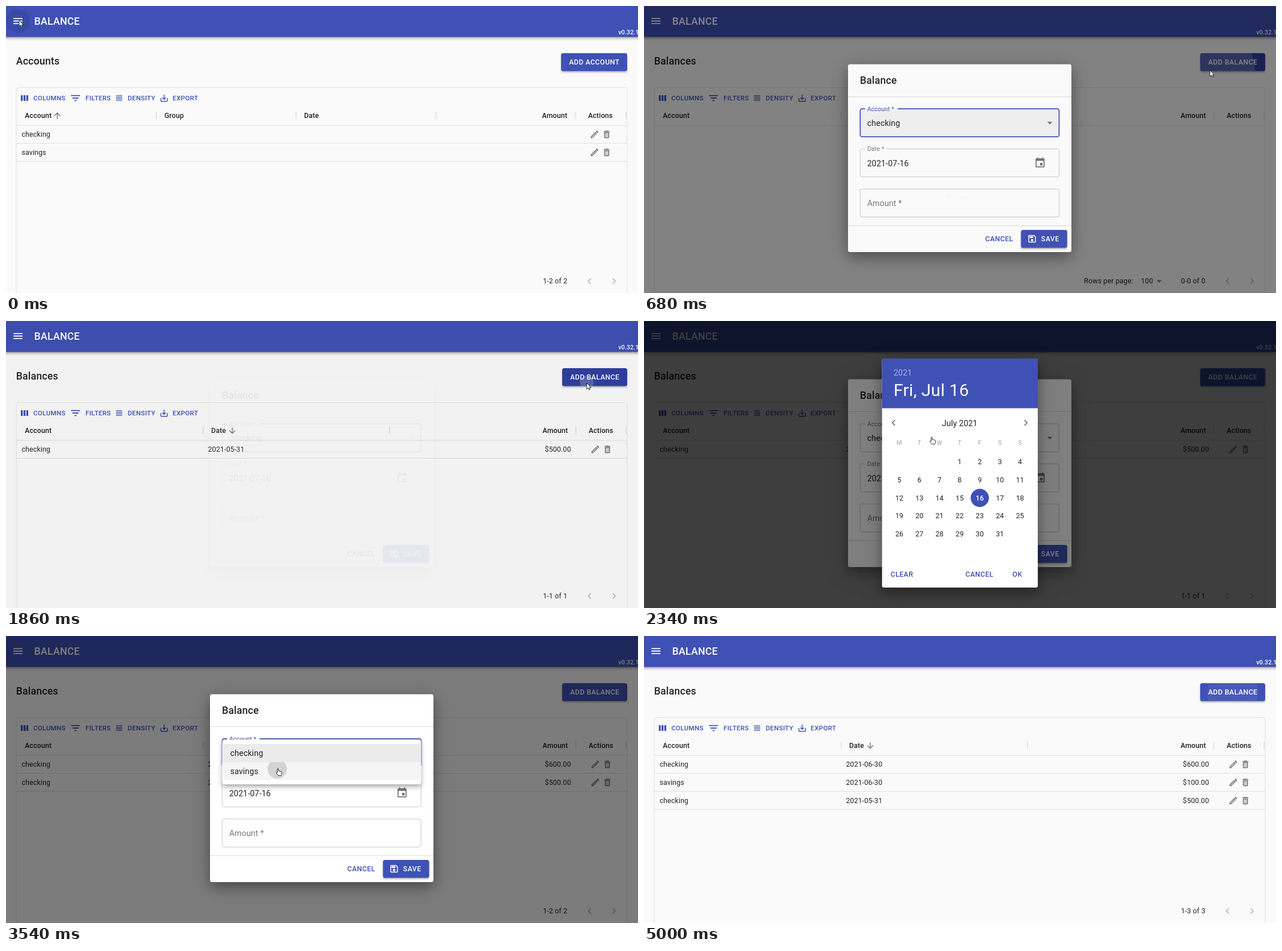
An HTML page that plays this animation: 1109x505 px, repeating every 5.07 s.

```html
<!DOCTYPE html>
<html lang="en">
<head>
<meta charset="utf-8">
<title>Balance</title>
<style>
  html, body { margin: 0; width: 100%; height: 100%; overflow: hidden; background: #fafafa; }
  svg { display: block; }
  text { font-family: Roboto, Arial, sans-serif; letter-spacing: .01em; white-space: pre; }
  .btn { letter-spacing: .0286em; font-weight: 500; }
  .bar { filter: drop-shadow(0 2px 2.5px rgba(0,0,0,.38)); }
  .raised { filter: drop-shadow(0 2px 1.5px rgba(0,0,0,.3)); }
  .paper { filter: drop-shadow(0 9px 10px rgba(0,0,0,.26)) drop-shadow(0 6px 18px rgba(0,0,0,.2)); }
  .menu { filter: drop-shadow(0 4px 4px rgba(0,0,0,.35)); }
</style>
</head>
<body>
<svg id="stage" width="1109" height="505" viewBox="0 0 1109 505"></svg>
<script>
const LOOP = 5070, BEATS = 73;
const BLUE = '#3f51b5', DARK = '#303f9f', INK = 'rgba(0,0,0,.87)', GREY = 'rgba(0,0,0,.54)', PALE = 'rgba(0,0,0,.26)';
const SMALL = 10.6, TOOL = 11.5, BODY = 12.4, INPUT = 14.2, HEAD = 17.7;

const PATHS = {
  menu: 'M3 18h18v-2H3v2zm0-5h18v-2H3v2zm0-7v2h18V6H3z',
  edit: 'M20.71 7.04c.39-.39.39-1.02 0-1.41l-2.34-2.34c-.39-.39-1.02-.39-1.41 0l-1.83 1.83 3.75 3.75 1.83-1.83zM3 17.25V21h3.75L17.81 9.94l-3.75-3.75L3 17.25zM5.92 19H5v-.92l9.06-9.06.92.92L5.92 19z',
  bin: 'M6 19c0 1.1.9 2 2 2h8c1.1 0 2-.9 2-2V7H6v12zM8 9h8v10H8V9zm7.5-5l-1-1h-5l-1 1H5v2h14V4z',
  columns: 'M3 5h4.6v14H3zM9.7 5h4.6v14H9.7zM16.4 5H21v14h-4.6z',
  filter: 'M10 18h4v-2h-4v2zM3 6v2h18V6H3zm3 7h12v-2H6v2z',
  density: 'M4 15h16v-2H4v2zm0 4h16v-2H4v2zm0-8h16V9H4v2zm0-6v2h16V5H4z',
  export: 'M19 12v7H5v-7H3v7c0 1.1.9 2 2 2h14c1.1 0 2-.9 2-2v-7h-2zm-6 .67l2.59-2.58L17 11.5l-5 5-5-5 1.41-1.41L11 12.67V3h2z',
  up: 'M4 12l1.41 1.41L11 7.83V20h2V7.83l5.58 5.59L20 12l-8-8-8 8z',
  down: 'M20 12l-1.41-1.41L13 16.17V4h-2v12.17l-5.58-5.59L4 12l8 8 8-8z',
  left: 'M15.41 7.41L14 6l-6 6 6 6 1.41-1.41L10.83 12z',
  right: 'M10 6L8.59 7.41 13.17 12l-4.58 4.59L10 18l6-6z',
  drop: 'M7 10l5 5 5-5z',
  event: 'M17 12h-5v5h5v-5zM16 1v2H8V1H6v2H5c-1.11 0-1.99.9-1.99 2L3 19c0 1.1.89 2 2 2h14c1.1 0 2-.9 2-2V5c0-1.1-.9-2-2-2h-1V1h-2zm3 18H5V8h14v11z',
  save: 'M17 3H5c-1.11 0-2 .9-2 2v14c0 1.1.89 2 2 2h14c1.1 0 2-.9 2-2V7l-4-4zm2 16H5V5h11.17L19 7.83V19zm-7-7c-1.66 0-3 1.34-3 3s1.34 3 3 3 3-1.34 3-3-1.34-3-3-3zM6 6h9v4H6z'
};

// Markup helpers; text and icons are placed by their vertical centre.
const text = (x, cy, s, size = BODY, extra = '', fill = INK) =>
  `<text x="${x}" y="${cy + size * .355}" font-size="${size}" fill="${fill}" ${extra}>${s}</text>`;
const rect = (x, y, w, h, fill, extra = '') =>
  `<rect x="${x}" y="${y}" width="${w}" height="${h}" fill="${fill}" ${extra}/>`;
const icon = (name, cx, cy, size, fill) =>
  `<path d="${PATHS[name]}" fill="${fill}" transform="translate(${cx - size / 2} ${cy - size / 2}) scale(${size / 24})"/>`;
const group = (id, body, extra = '') => `<g id="${id}" ${extra}>${body}</g>`;
const MED = 'font-weight="500"', END = 'text-anchor="end"', MID = 'text-anchor="middle"', BTN = 'class="btn"';

const rowIcons = (x, y) => icon('edit', x, y, 17.7, GREY) +
  rect(x + 18.4, y - 2, 6, 7.4, 'rgba(0,0,0,.18)') + icon('bin', x + 21.3, y, 17.7, GREY);
const line = y => rect(18, y - .5, 1072, 1, '#e0e0e0');
const marks = xs => xs.map(x => rect(x - .9, 186, 1.8, 13, '#e0e0e0')).join('');
const pages = s => text(985, 484, s, BODY, END);

const rows = (list, actionX) => list.map(([name, date, sum], i) => {
  const y = 225.8 + i * 31.9;
  return text(27.5, y, name) + text(354.5, y, date) + text(991.5, y, sum, BODY, END) +
    rowIcons(actionX, y) + line(241.5 + i * 31.9);
}).join('');

const chrome = () => {
  const tools = [['columns', 32.5, 17.3, 48, 'COLUMNS'], ['filter', 122, 21.2, 139.5, 'FILTERS'],
    ['density', 198.5, 16.5, 213.5, 'DENSITY'], ['export', 277.5, 17, 292.3, 'EXPORT']];
  return rect(0, 0, 1109, 505, '#fafafa') +
    `<rect x="18" y="143.5" width="1072" height="400" rx="3.5" fill="none" stroke="#e0e0e0"/>` +
    tools.map(([n, ix, s, tx, label]) => icon(n, ix, 162, s, BLUE) + text(tx, 162, label, TOOL, BTN, BLUE)).join('') +
    line(210) + text(33, 192.3, 'Account', BODY, MED) +
    icon('left', 1024, 484, 21.2, PALE) + icon('right', 1067, 484, 21.2, PALE) +
    rect(-10, -10, 1129, 64.5, BLUE, 'class="bar"') +
    `<circle id="halo" cx="21" cy="26.5" r="21" fill="rgba(0,0,0,.09)"/>` +
    icon('menu', 21, 26.5, 21.2, '#fff') + text(49.5, 26.5, 'BALANCE', HEAD, MED, '#fff') +
    text(1074.5, 45.8, 'v0.32.1', SMALL, MED, '#fff');
};

const accounts = () => text(17.7, 97, 'Accounts', HEAD, MED) +
  rect(974, 83, 116, 31.5, BLUE, 'rx="3.5" class="raised"') + text(988, 99, 'ADD ACCOUNT', BODY, BTN, '#fff') +
  icon('up', 90, 193, 17, GREY) + text(278, 192.3, 'Group', BODY, MED) + text(523, 192.3, 'Date', BODY, MED) +
  text(985, 192.3, 'Amount', BODY, MED + END.padStart(20)) + text(1043, 192.3, 'Actions', BODY, MED + ' ' + MID) +
  marks([264, 509, 754.5, 999.5, 1088]) +
  rows([['checking', '', ''], ['savings', '', '']], 1032.7) + pages('1-2 of 2');

const june = ['checking', '2021-06-30', '$600.00'], may = ['checking', '2021-05-31', '$500.00'],
  saved = ['savings', '2021-06-30', '$100.00'];
const bodies = [[], [may], [june, may], [june, saved, may]];

const balances = () => text(17.7, 97, 'Balances', HEAD, MED) +
  rect(976, 83, 114, 31.5, BLUE, 'rx="3.5" class="raised" id="add"') +
  '<clipPath id="addClip"><rect x="976" y="83" width="114" height="31.5" rx="3.5"/></clipPath>' +
  '<circle id="ripple" clip-path="url(#addClip)" fill="#fff"/>' +
  text(990, 99, 'ADD BALANCE', BODY, BTN, '#fff') +
  text(360, 192.3, 'Date', BODY, MED) + text(986, 192.3, 'Amount', BODY, MED + ' ' + END) +
  text(1044, 192.3, 'Actions', BODY, MED + ' ' + MID) + marks([346, 673, 1000, 1088]) +
  bodies.map((list, n) => group('body' + n, n
    ? rows(list, 1034) + icon('down', 397, 193, 17, GREY) + pages(`1-${n} of ${n}`)
    : text(554, 336, 'No rows', BODY, MID) + text(772, 484, 'Rows per page:') + text(872, 484, '100') +
      icon('drop', 904, 484, 21.2, GREY) + pages('0-0 of 0'))).join('');

const field = (id, y, notch) =>
  `<rect id="${id}Box" x="379.4" y="${y}" width="349" height="49.3" rx="3.5"/>` +
  rect(388, y - 1.5, notch, 3, '#fff', `id="${id}Gap"`);

const dialog = () => rect(358, 102.5, 392, 330.5, '#fff', 'rx="3.5" class="paper"') +
  text(379, 130.5, 'Balance', HEAD, MED) + rect(358, 159, 392, 1, '#dcdcdc') + rect(358, 386, 392, 1, '#dcdcdc') +
  field('acc', 180.9, 57) + text(391.7, 181.2, 'Account *', SMALL, 'id="accLabel"') +
  text(391.7, 205.5, '', INPUT, 'id="accText"') + icon('drop', 712, 205.5, 21.2, GREY) +
  field('date', 251.4, 37) + text(391.7, 251.7, 'Date *', SMALL, '', GREY) +
  text(391.7, 276.5, '', INPUT, 'id="dateText"') + icon('event', 695, 276, 21.2, GREY) +
  field('sum', 322, 56) + text(391.7, 347, 'Amount *', INPUT, 'id="sumHint"', GREY) +
  text(391.7, 322.3, 'Amount *', SMALL, 'id="sumLabel"', BLUE) + text(391.7, 347, '', INPUT, 'id="sumText"') +
  text(598.8, 409.5, 'CANCEL', BODY, BTN, BLUE) +
  rect(661.5, 394, 81, 31.5, BLUE, 'rx="3.5" class="raised" id="saveBtn"') +
  icon('save', 681, 409.7, 17.7, '#fff') + text(696.8, 409.5, 'SAVE', BODY, BTN, '#fff');

const menu = () => rect(379.4, 182.5, 349, 78.5, '#fff', 'rx="3.5" class="menu"') +
  rect(379.4, 190, 349, 32, '#ebebeb') + rect(379.4, 222, 349, 31.6, '#f5f5f5') +
  '<clipPath id="itemClip"><rect x="379" y="222" width="350" height="31.6"/></clipPath>' +
  '<circle id="press" cx="476" cy="234" r="17" fill="rgba(0,0,0,.14)" clip-path="url(#itemClip)"/>' +
  text(393.5, 206, 'checking', INPUT) + text(393.5, 238, 'savings', INPUT);

// [id, month, weekday offset, days, selected day, headline]
const months = [
  ['jul', 'July 2021', 3, 31, 16, 'Fri, Jul 16'], ['jun', 'June 2021', 1, 30, 0, 'Fri, Jul 16'],
  ['may', 'May 2021', 5, 31, 0, 'Fri, Jul 16'], ['may31', 'May 2021', 5, 31, 31, 'Mon, May 31'],
  ['jun30', 'June 2021', 1, 30, 30, 'Wed, Jun 30']];
const dayPos = cell => [448 + cell % 7 * 35.3, 247.5 + Math.floor(cell / 7) * 31.85];

const month = ([id, name, offset, count, chosen, title]) => {
  let out = text(438, 121.5, title, 30.1, '', '#fff') + text(554, 179.5, name, INPUT, MID);
  for (let d = 1; d <= count; d++) {
    const [x, y] = dayPos(d + offset - 1), on = d === chosen;
    if (on) out += `<circle cx="${x}" cy="${y}" r="16" fill="${BLUE}"/>`;
    out += text(x, y, d, BODY, MID + (on ? ' ' + MED : ''), on ? '#fff' : INK);
  }
  return group(id, out);
};

const picker = () => rect(417.7, 66, 273.3, 403, '#fff', 'rx="3.5" class="paper"') +
  `<path d="M417.7 153.5V69.5a3.5 3.5 0 0 1 3.5-3.5h266.3a3.5 3.5 0 0 1 3.5 3.5v84z" fill="${BLUE}"/>` +
  text(438, 91, '2021', INPUT, '', 'rgba(255,255,255,.54)') +
  icon('left', 438, 179, 21.2, GREY) + icon('right', 670, 179, 21.2, GREY) +
  [...'MTWTFSS'].map((c, i) => text(dayPos(i)[0], 214, c, SMALL, MID, 'rgba(0,0,0,.38)')).join('') +
  months.map(month).join('') +
  group('okPress', rect(627.5, 430.5, 55, 31.5, 'rgba(63,81,181,.08)', 'rx="3.5"') +
    `<path d="M627.5 430.5h34q7 15 0 31.5h-34z" fill="rgba(63,81,181,.18)"/>`) +
  text(432.7, 446, 'CLEAR', BODY, BTN, BLUE) + text(564, 446, 'CANCEL', BODY, BTN, BLUE) +
  text(646.5, 446, 'OK', BODY, BTN, BLUE);

const shade = id => rect(0, 0, 1109, 505, '#000', `id="${id}"`);
const HAND = 'M2.2 1.2c0-1.4 2-1.4 2 0V5c.4-.9 2-.8 2 .2.5-.7 1.9-.5 1.9.4.6-.5 1.8-.2 1.8.8V9c0 2-1 3-1.4 3.6H3.5C2.8 11 .8 9 .3 7.8c-.3-1 .9-1.3 1.9 0Z';

document.getElementById('stage').innerHTML = chrome() + group('accounts', accounts()) + group('balances', balances()) +
  shade('dim1') + group('dialog', dialog()) + group('menu', menu()) + shade('dim2') + group('picker', picker()) +
  group('cursor', `<path id="arrow" d="M0 0V11L2.6 8.7 4.3 12.4 6 11.6 4.4 8.1H7.6Z"/>` +
    `<path id="hand" d="${HAND}" transform="translate(-3 0)"/>`, 'fill="#fff" stroke="#111" stroke-width=".9" stroke-linejoin="round"');

// Held values: [beat, value]
const track = {
  page: [[0, 'accounts'], [4, 'balances']],
  count: [[0, 0], [25, 1], [45, 2], [68, 3]],
  dialog: [[0, 0], [10, .965], [11, 1], [25, .3], [26, 0], [27, .06], [28, 1], [45, .3], [46, 0], [47, .5], [48, 1], [68, .3], [69, 0]],
  picker: [[0, 0], [13, .9], [14, 1], [18, .4], [19, 0], [32, .9], [33, 1], [39, .4], [40, 0], [55, .9], [56, 1], [61, .4], [62, 0]],
  month: [[0, 'jul'], [14, 'jun'], [15, 'may'], [17, 'may31'], [27, 'jul'], [34, 'jun'], [37, 'jun30'], [47, 'jul'], [57, 'jun'], [59, 'jun30']],
  menu: [[0, 0], [50, .9], [51, 1], [52, 0]],
  account: [[0, 'checking'], [52, 'savings']],
  date: [[0, '2021-07-16'], [18, '2021-05-31'], [27, '2021-07-16'], [39, '2021-06-30'], [47, '2021-07-16'], [61, '2021-06-30']],
  sum: [[0, ''], [21, '5'], [22, '50'], [23, '500'], [27, ''], [42, '60'], [43, '600'], [47, ''], [64, '1'], [65, '10'], [66, '100']],
  focus: [[0, 'acc'], [13, ''], [20, 'sum'], [24, ''], [27, 'acc'], [32, ''], [41, 'sum'], [44, ''], [47, 'acc'], [55, ''], [63, 'sum'], [67, '']],
  // centre x, centre y, radius, opacity
  ripple: [[0, null], [10, [993, 113, 79, .2]], [11, null], [27, [1019, 108, 12, .2]], [28, null], [47, [1024, 108, 50, .2]], [48, null], [68, [1033, 99, 45, .05]]]
};
// beat, x, y, hand?
const path = [
  [0, 23, 25], [2, 40, 90], [4, 60, 110], [8, 985, 108], [10, 993, 113], [12, 695, 276, 1], [14, 438, 179, 1], [15, 438, 179, 1],
  [17, 448, 405, 1], [18, 650, 446, 1], [20, 540, 348], [23, 560, 352], [24, 700, 410, 1], [26, 1017, 107], [27, 1019, 109],
  [29, 880, 200], [31, 695, 276, 1], [34, 438, 179, 1], [37, 518, 375, 1], [39, 648, 447, 1], [40, 526, 367], [41, 520, 350],
  [43, 540, 352], [44, 700, 410, 1], [46, 1022, 107], [47, 1024, 108], [49, 520, 206, 1], [51, 477, 233, 1], [54, 695, 276, 1],
  [57, 438, 179, 1], [59, 518, 375, 1], [60, 640, 446, 1], [61, 648, 448, 1], [63, 530, 350], [66, 545, 352], [67, 700, 410, 1], [71, 830, 520]];

const $ = id => document.getElementById(id);
const held = (name, k) => track[name].filter(s => s[0] <= k).pop()[1];
const show = (id, on) => $(id).setAttribute('visibility', on ? 'inherit' : 'hidden');
const fade = (id, a) => { show(id, a > 0); $(id).setAttribute('opacity', a); };
const set = (id, attrs) => { for (const a in attrs) $(id).setAttribute(a, attrs[a]); };

function pointer(k) {
  const i = path.findLastIndex(p => p[0] <= k), a = path[i], b = path[i + 1] || a;
  const u = b === a ? 0 : (k - a[0]) / (b[0] - a[0]), e = u * u * (3 - 2 * u);
  set('cursor', { transform: `translate(${a[1] + (b[1] - a[1]) * e} ${a[2] + (b[2] - a[2]) * e})` });
  show('cursor', k < 71);
  const hand = !!a[3] && (u === 0 || !!b[3]);
  show('hand', hand);
  show('arrow', !hand);
}

function draw(k) {
  const page = held('page', k), count = held('count', k), focus = held('focus', k), sum = held('sum', k);
  show('halo', k < 2);
  show('accounts', page === 'accounts');
  show('balances', page === 'balances');
  bodies.forEach((_, n) => show('body' + n, n === count));

  const over = [9, 10, 26, 27, 46, 47].includes(k), ripple = held('ripple', k);
  set('add', { fill: over ? DARK : BLUE });
  show('ripple', ripple);
  if (ripple) {
    const [cx, cy, r, opacity] = ripple;
    set('ripple', { cx, cy, r, opacity });
  }

  const d = held('dialog', k), p = held('picker', k);
  fade('dialog', d);
  fade('dim1', d * .5);
  fade('picker', p);
  fade('dim2', p * .5);
  fade('menu', held('menu', k));
  show('press', k === 51);
  months.forEach(([id]) => show(id, id === held('month', k)));
  show('okPress', [18, 39, 60, 61].includes(k));

  for (const id of ['acc', 'date', 'sum']) {
    const on = focus === id;
    set(id + 'Box', {
      stroke: on ? BLUE : 'rgba(0,0,0,.23)', 'stroke-width': on ? 1.8 : .95,
      fill: on && id === 'acc' ? 'rgba(0,0,0,.05)' : 'none'
    });
  }
  const raised = focus === 'sum' || sum !== '';
  show('sumGap', raised);
  show('sumLabel', raised);
  show('sumHint', !raised);
  set('sumLabel', { fill: focus === 'sum' ? BLUE : GREY });
  set('accLabel', { fill: focus === 'acc' ? BLUE : GREY });
  set('saveBtn', { fill: [24, 44, 67].includes(k) ? DARK : BLUE });
  $('accText').textContent = held('account', k);
  $('dateText').textContent = held('date', k);
  $('sumText').textContent = sum;
  pointer(k);
}

// The picture advances in even beats, each one held.
const start = performance.now();
let last = -1;
function tick() {
  const t = (performance.now() - start) % LOOP;
  const k = Math.min(BEATS - 1, Math.floor((t + 16) / (LOOP / BEATS)));
  if (k !== last) draw(last = k);
  requestAnimationFrame(tick);
}
tick();
</script>
</body>
</html>
```
